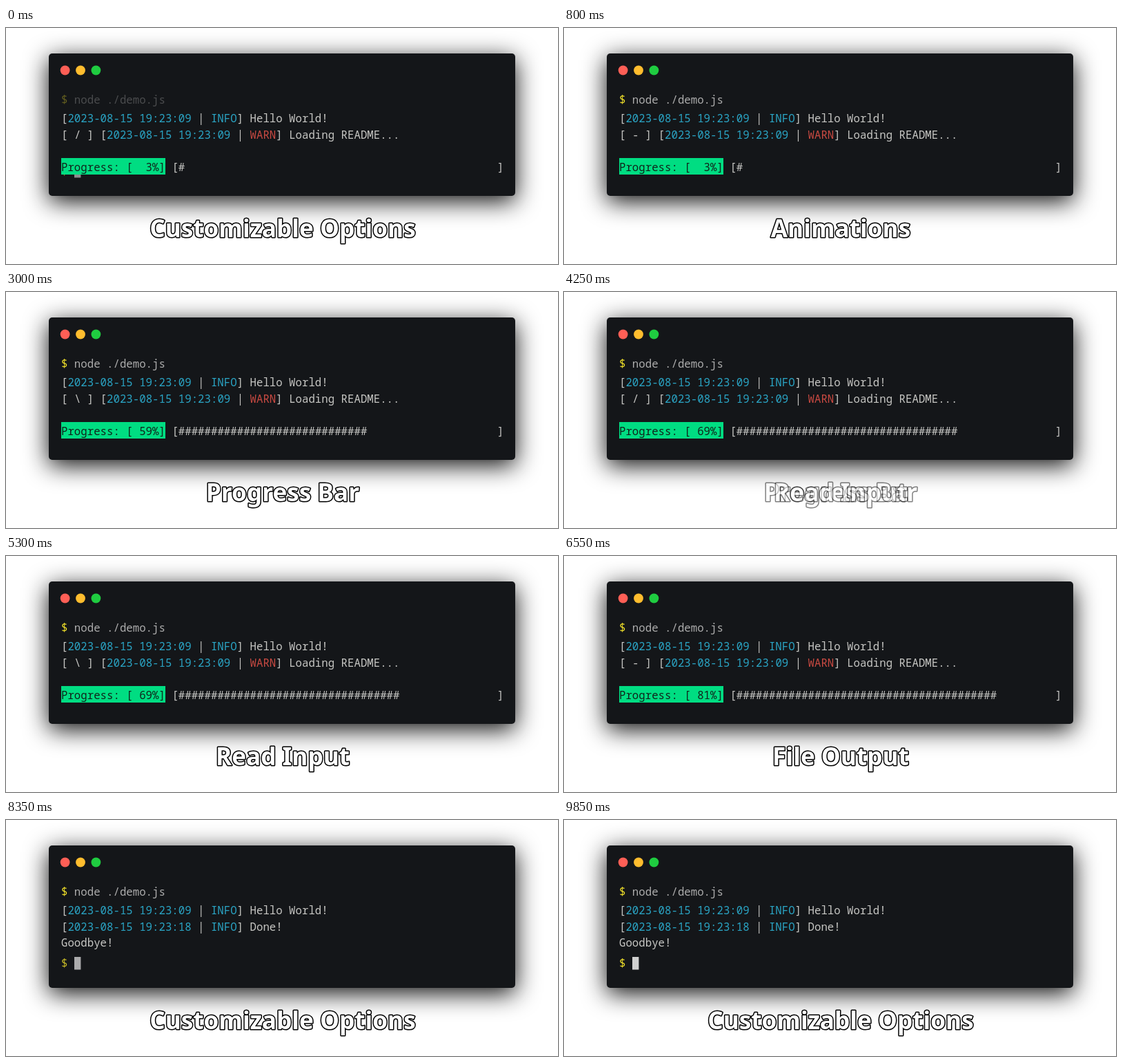
Recreate the animation shown at these times as an HTML page. Size 800 by 343 pixels, loop 10 s.

```html
<!DOCTYPE html>
<html lang="en">
<head>
<meta charset="utf-8">
<title>Terminal demo</title>
<style>
html, body { margin: 0; width: 100%; height: 100%; overflow: hidden; background: #fff; }
#window {
  position: absolute; left: 62px; top: 37px; width: 676px; height: 207px;
  border-radius: 5px; background: #141619;
  box-shadow: 0 8px 35px rgba(0, 0, 0, .95);
}
svg { position: absolute; left: 0; top: 0; }
text { font: 15.72px "Noto Sans Mono", monospace; fill: #c6c6c3; white-space: pre; }
.command { fill: #acacac; }
.prompt { fill: #f0e02a; }
.info { fill: #2aa4c4; }
.warn { fill: #c94a42; }
text.label { fill: #10251b; }
text.caption {
  font: bold 35.2px "Noto Sans", sans-serif; text-anchor: middle;
  fill: #fff; stroke: #000; stroke-width: 3px; stroke-linejoin: round; paint-order: stroke;
}
</style>
</head>
<body>
<div id="window"></div>
<svg width="800" height="343">
  <circle cx="85.6" cy="61.5" r="6.9" fill="#ff5f56"/>
  <circle cx="108" cy="61.5" r="6.9" fill="#ffbd2e"/>
  <circle cx="130.4" cy="61.5" r="6.9" fill="#1fcc40"/>

  <text id="command" class="command" x="80" y="110"><tspan class="prompt">$</tspan> node ./demo.js</text>
  <text x="80" y="137">[<tspan class="info">2023-08-15 19:23:09</tspan> | <tspan class="info">INFO</tspan>] Hello World!</text>

  <g id="prompt">
    <text class="prompt" x="80" y="213.5">$</text>
    <rect id="cursor" x="99" y="199" width="9.4" height="18.5" fill="#d0d0d0"/>
  </g>

  <g id="loading">
    <text x="80" y="160.6">[ <tspan id="spinner">/</tspan> ] [<tspan class="info">2023-08-15 19:23:09</tspan> | <tspan class="warn">WARN</tspan>] Loading README...</text>
    <rect x="80" y="189" width="151" height="24" fill="#00dd82"/>
    <text id="label" class="label" x="80" y="207.8"></text>
    <text id="bar" x="240.4" y="207.8"></text>
  </g>

  <g id="done">
    <text x="80" y="160.6">[<tspan class="info">2023-08-15 19:23:18</tspan> | <tspan class="info">INFO</tspan>] Done!</text>
    <text x="80" y="184.4">Goodbye!</text>
  </g>

  <text id="oldCaption" class="caption" x="401" y="304"></text>
  <text id="newCaption" class="caption" x="401" y="304"></text>
</svg>
<script>
const LOOP = 10000, SLOT = 2000, DONE_AT = 8000, BAR_WIDTH = 49;
const captions = ["Animations", "Progress Bar", "Read Input", "File Output", "Customizable Options"];
const percents = [3, 38, 59, 69, 81, 92];
const el = id => document.getElementById(id);
const ramp = (t, start, length) => Math.min(1, Math.max(0, (t - start) / length));
const show = (id, opacity) => el(id).setAttribute("opacity", opacity);
const write = (id, text) => { el(id).textContent = text; };

function drawTerminal(t) {
  const done = t >= DONE_AT;
  const intro = ramp(t, -200, 570);
  show("command", intro);
  show("loading", done ? 0 : 1);
  show("done", done ? 1 : 0);
  show("prompt", done ? ramp(t, 8150, 250) : 1 - intro);
  show("cursor", t >= 9200 && t < 9850 ? 0 : 1);

  write("spinner", "/-\\|"[Math.floor(t / 500) % 4]);
  const step = Math.floor((t + 500) / 1500);
  const percent = percents[Math.min(step, percents.length - 1)];
  const hashes = Math.round(percent / 100 * BAR_WIDTH);
  write("label", `Progress: [${String(percent).padStart(3)}%]`);
  write("bar", `[${"#".repeat(hashes).padEnd(BAR_WIDTH)}]`);
}

function drawCaption(t) {
  const slot = Math.floor(t / SLOT);
  const mix = ramp(t % SLOT, 150, 200);
  write("oldCaption", captions[(slot + 4) % 5]);
  write("newCaption", captions[slot]);
  show("oldCaption", 1 - mix);
  show("newCaption", mix);
}

const begin = performance.now();
function frame() {
  const t = (performance.now() - begin) % LOOP;
  drawTerminal(t);
  drawCaption(t);
  requestAnimationFrame(frame);
}
frame();
</script>
</body>
</html>
```
